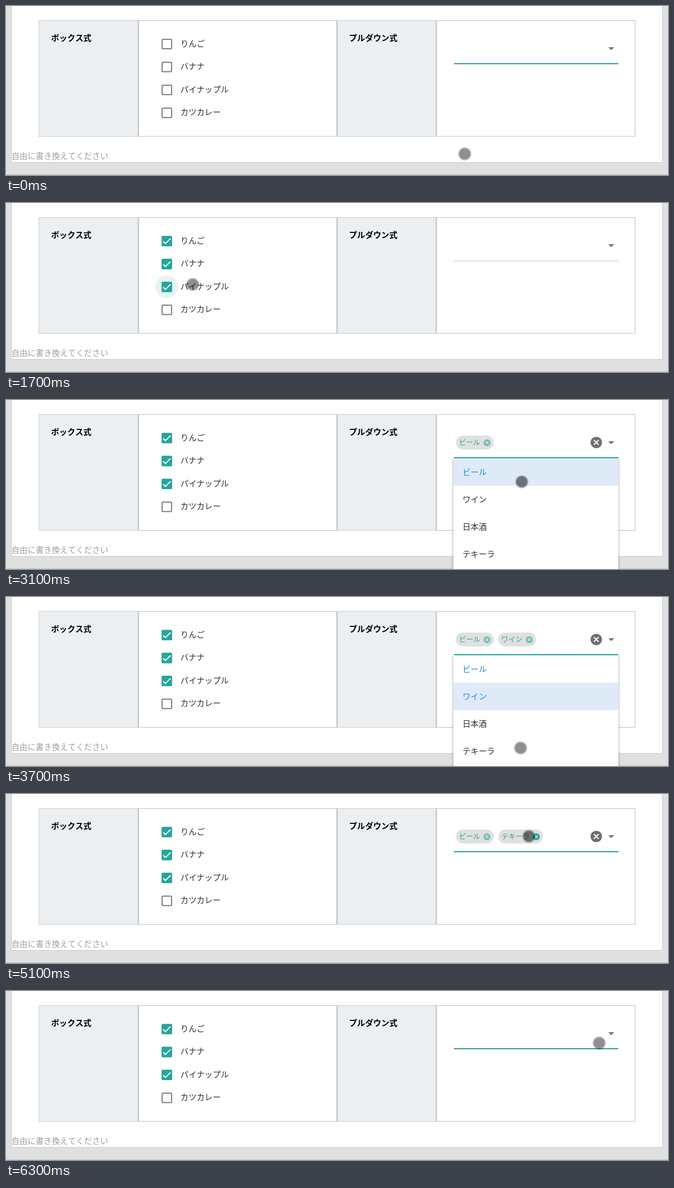
These frames come from a looping animation (1280 px wide and 328 px high, 6500 ms). An HTML page with a canvas:

```html
<!DOCTYPE html>
<html lang="ja">
<head>
<meta charset="utf-8">
<style>
html, body { margin: 0; width: 100%; height: 100%; overflow: hidden; background: #e0e0e0; }
canvas { display: block; }
</style>
</head>
<body>
<canvas id="stage" width="1280" height="328"></canvas>
<script>
const ctx = document.getElementById('stage').getContext('2d');
const LOOP = 6500, STEP = 100;
const TEAL = '#26a69a', GREY = '#757575', LINE = '#c5c7c9', INK = '#2c2c2c';
const FONT = '"Noto Sans CJK JP", "Noto Sans CJK", sans-serif';
const FIELD = { x: 866, width: 318, y: 112 };

const boxes = [
  { label: 'りんご', hover: 570, click: 700, leave: 880 },
  { label: 'バナナ', hover: 890, click: 900, leave: 1150 },
  { label: 'パイナップル', hover: 1200, click: 1500, leave: 2600 },
  { label: 'カツカレー' }
];
const drinks = [
  { label: 'ビール', from: 3000, to: 6000 },
  { label: 'ワイン', from: 3500, to: 5000 },
  { label: '日本酒' },
  { label: 'テキーラ', from: 3750, to: 5500 }
];
const menu = { open: 2550, close: 4150 };
const focuses = [
  { from: -LOOP, to: 650 },
  { from: menu.open, to: menu.close },
  { from: 4750, to: 5500 },
  { from: 6000, to: LOOP }
];
const clicks = [menu.open, menu.close, ...boxes.map(b => b.click), ...drinks.flatMap(d => [d.from, d.to])];

// Places the pointer visits, with the time it gets there.
const stops = [
  { at: 0, x: 887, y: 287 },
  { at: 500, x: 430, y: 31 },
  { at: 700, x: 369, y: 72 },
  { at: 1000, x: 369, y: 115 },
  { at: 1300, x: 361, y: 158 },
  { at: 2400, x: 1036, y: 119 },
  { at: 2900, x: 998, y: 140 },
  { at: 3400, x: 996, y: 193 },
  { at: 3700, x: 995, y: 293 },
  { at: 4200, x: 774, y: 200 },
  { at: 4500, x: 976, y: 157 },
  { at: 4700, x: 1011, y: 82 },
  { at: 6000, x: 1141, y: 85 },
  { at: 6300, x: 1147, y: 101 }
];
const LONGEST_MOVE = 600;

const clamp = v => Math.min(1, Math.max(0, v));
const easeOut = v => 1 - (1 - clamp(v)) ** 1.5;
const easeInOut = v => v * v * (3 - 2 * v);
const during = (t, { from, to }) => t >= from && t < to;

function rect(x, y, w, h, color) {
  ctx.fillStyle = color;
  ctx.fillRect(x, y, w, h);
}

function text(s, x, midY, color, size = 15.6, weight = 300) {
  ctx.font = `${weight} ${size}px ${FONT}`;
  ctx.fillStyle = color;
  ctx.fillText(s, x, midY + size * 0.375);
}

function disc(x, y, r, color) {
  ctx.fillStyle = color;
  ctx.beginPath();
  ctx.arc(x, y, r, 0, 7);
  ctx.fill();
}

function pill(x, y, w, h, r, color) {
  ctx.fillStyle = color;
  ctx.beginPath();
  ctx.roundRect(x, y, w, h, r);
  ctx.fill();
}

function crossIcon(x, y, r, color, crossColor, alpha = 1) {
  const d = r * 0.42;
  ctx.globalAlpha = alpha;
  disc(x, y, r, color);
  ctx.globalAlpha = 1;
  ctx.strokeStyle = crossColor;
  ctx.lineWidth = r * 0.2;
  ctx.beginPath();
  ctx.moveTo(x - d, y - d);
  ctx.lineTo(x + d, y + d);
  ctx.moveTo(x + d, y - d);
  ctx.lineTo(x - d, y + d);
  ctx.stroke();
}

function drawPage() {
  rect(0, 0, 1280, 328, '#e0e0e0');
  rect(0, 327, 1280, 1, '#bdbdbd');
  rect(10, 0, 1260, 304, '#c6c6c6');
  rect(11, 0, 1258, 303, '#fff');
  rect(63.2, 27.5, 1153.8, 226.2, LINE);
  rect(64.5, 28.8, 1151.2, 223.6, '#fff');
  ['ボックス式', 'プルダウン式'].forEach((title, i) => {
    const x = 64.5 + i * 576;
    rect(x, 28.8, 190, 223.6, '#ebeff2');
    rect(x + 190, 28, 2.7, 225, LINE);
    if (i) rect(x - 1.8, 28, 2.7, 225, LINE);
    text(title, x + 22.7, 62, '#000', 15.6, 700);
  });
  text('自由に書き換えてください', 10.5, 291.5, '#9e9e9e');
}

function drawCheck(x, y, progress) {
  const length = 29.8;
  ctx.save();
  ctx.translate(x, y);
  ctx.scale(0.67, 0.67);
  ctx.translate(-12.2, -12);
  ctx.strokeStyle = '#fff';
  ctx.lineWidth = 3.1;
  ctx.setLineDash([length * progress, 100]);
  ctx.beginPath();
  ctx.moveTo(1.73, 12.91);
  ctx.lineTo(8.1, 19.28);
  ctx.lineTo(22.79, 4.59);
  ctx.stroke();
  ctx.restore();
}

function drawBox({ label, hover, click, leave }, i, t) {
  const x = 311, y = 73.9 + i * 44.5;
  const ripple = easeOut((t - hover) / 200) * (1 - clamp((t - leave) / 110));
  if (ripple > 0) disc(x, y, 22 * ripple, 'rgba(38,166,154,.12)');
  const on = t > click;
  const fill = on ? clamp((t - click) / 180) : 0;
  const check = on ? clamp((t - click - 90) / 100) : 0;
  ctx.globalAlpha = fill;
  pill(x - 10, y - 10, 20, 20, 2, TEAL);
  ctx.globalAlpha = 1;
  ctx.strokeStyle = on ? TEAL : GREY;
  ctx.lineWidth = 2;
  ctx.beginPath();
  ctx.roundRect(x - 9.2, y - 9.2, 18.4, 18.4, 1.5);
  ctx.stroke();
  if (check > 0) drawCheck(x, y, check);
  text(label, 337.3, y - 1.2, INK);
}

function drawChip(label, x, y, hot) {
  const w = 32 + label.length * 13.65;
  pill(x, y - 13.6, w, 27.2, 13.6, '#e0e0e0');
  text(label, x + 6, y - 0.3, TEAL, 13.65);
  crossIcon(x + w - 13, y + 0.4, 6.7, TEAL, '#e6e6e6', hot ? 1 : 0.6);
  return w;
}

function drawSelect(t) {
  const picked = drinks.filter(d => during(t, d));
  const twoRows = picked.length > 2;
  const base = FIELD.y + (twoRows ? 22 : 0);
  let x = 870, y = twoRows ? 76 : 82.5;
  picked.forEach((d, i) => {
    if (i === 2) {
      x = 870;
      y += 35.5;
    }
    const hot = i === 1 && t >= 5000;
    x += drawChip(d.label, x, y, hot) + 8.8;
  });
  if (picked.length) crossIcon(1141.3, 82.4, 11, '#6f6f6f', '#fff');

  ctx.fillStyle = GREY;
  ctx.beginPath();
  ctx.moveTo(1164.5, 80);
  ctx.lineTo(1176, 80);
  ctx.lineTo(1170.2, 85.7);
  ctx.fill();

  rect(FIELD.x, base, FIELD.width, 1, '#bdbdbd');
  const focus = focuses.find(f => during(t, f));
  if (focus) {
    const w = FIELD.width * easeOut((t - focus.from) / 300);
    rect(FIELD.x + (FIELD.width - w) / 2, base - 1, w, 2, '#169c90');
  }
  drawMenu(t, base + 1);
}

function drawMenu(t, top) {
  const alpha = clamp((t - menu.open) / 250) * (1 - clamp((t - menu.close) / 250));
  if (alpha <= 0) return;
  const row = 53.3, left = FIELD.x - 1;
  const latest = drinks.findLastIndex(d => t >= d.from);
  ctx.save();
  ctx.globalAlpha = alpha;
  ctx.save();
  ctx.beginPath();
  ctx.rect(left - 10, top, FIELD.width + 20, 300);
  ctx.clip();
  ctx.shadowColor = 'rgba(0,0,0,.38)';
  ctx.shadowBlur = 5;
  ctx.shadowOffsetY = 1;
  rect(left, top, FIELD.width + 1, 260, '#fff');
  ctx.restore();
  drinks.forEach((d, i) => {
    const y = top + i * row;
    if (i === Math.max(0, latest)) rect(left, y, FIELD.width + 1, row, '#deebf7');
    text(d.label, left + 17.7, y + row / 2, t >= d.from ? '#2384da' : INK);
  });
  ctx.restore();
}

function pointerAt(t) {
  const next = stops.findIndex(s => s.at > t);
  if (next < 0) return stops.at(-1);
  const a = stops[next - 1], b = stops[next];
  const duration = Math.min(LONGEST_MOVE, b.at - a.at);
  const k = easeInOut(clamp(1 - (b.at - t) / duration));
  return { x: a.x + (b.x - a.x) * k, y: a.y + (b.y - a.y) * k };
}

function drawPointer(t) {
  const { x, y } = pointerAt(t);
  const pressed = clicks.some(c => t > c && t <= c + STEP);
  disc(x, y, 12.7, 'rgba(0,0,0,.25)');
  disc(x, y, 10.6, `rgba(0,0,0,${pressed ? 0.36 : 0.25})`);
}

function render(now) {
  const t = Math.min(LOOP - 2 * STEP, Math.floor((now % LOOP) / STEP) * STEP);
  drawPage();
  boxes.forEach((box, i) => drawBox(box, i, t));
  drawSelect(t);
  drawPointer(t);
}

ctx.fontKerning = 'none';
const start = performance.now();
function tick() {
  render(performance.now() - start);
  requestAnimationFrame(tick);
}
tick();
</script>
</body>
</html>
```
